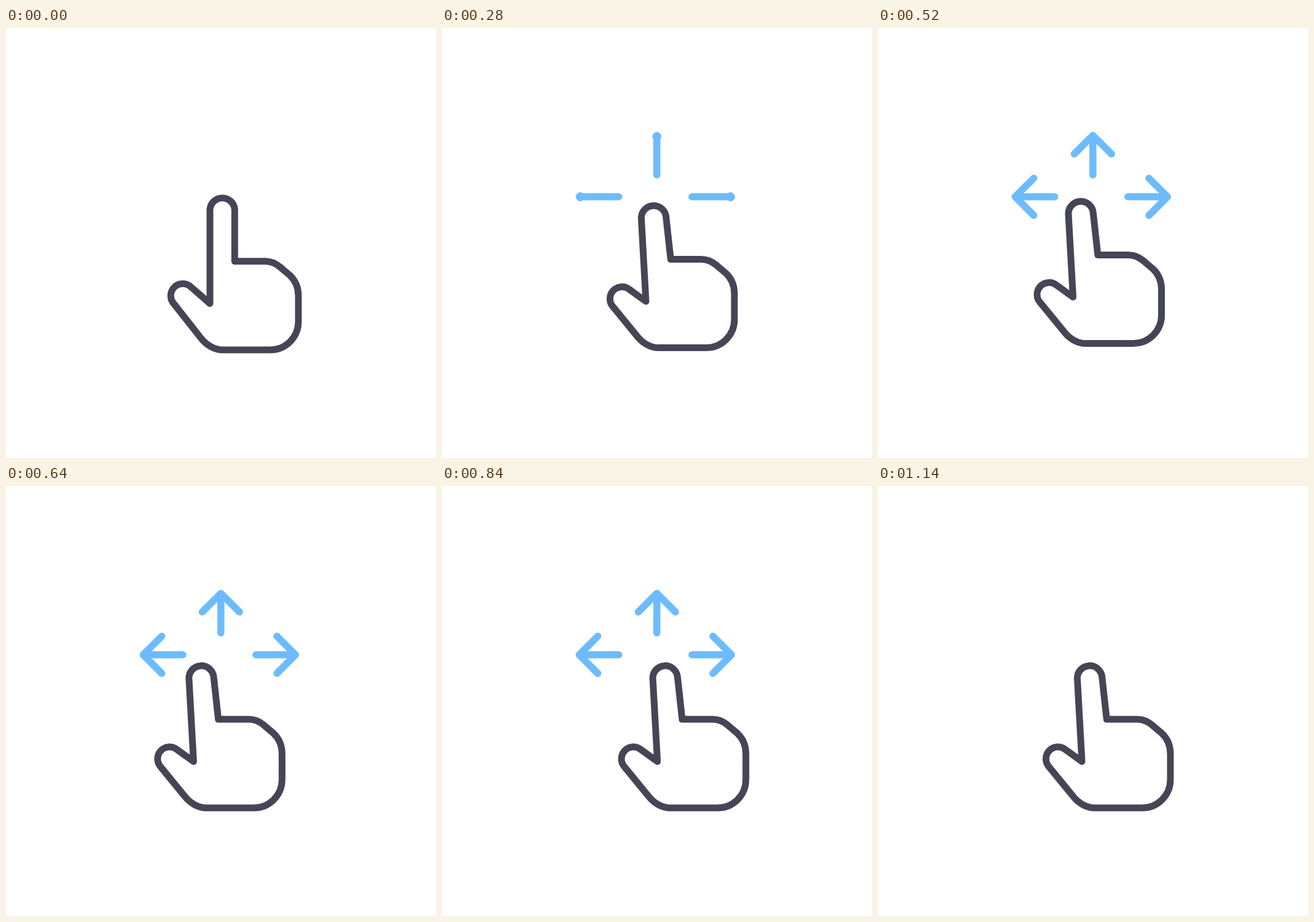
An HTML page that plays this animation: 700x700 px, repeating every 1200 ms.

```html
<!DOCTYPE html>
<html lang="en">
<head>
<meta charset="utf-8">
<title>Drag gesture</title>
<style>
  html, body { margin: 0; width: 100%; height: 100%; overflow: hidden; background: #fff; }
  svg { display: block; width: 100%; height: 100%; }
  path { fill: none; stroke-linecap: round; stroke-linejoin: round; }
  #arrows path { stroke: #6dbbff; stroke-width: 11.5; }
  #hand { stroke: #464556; stroke-width: 11; }
</style>
</head>
<body>
<svg viewBox="0 0 700 700">
  <g id="arrows">
    <path transform="translate(349.8 239.3) rotate(-90)"/>
    <path transform="translate(287.8 274.8) rotate(180)"/>
    <path transform="translate(406.8 274.8)"/>
  </g>
  <path id="hand"/>
</svg>
<script>
const LOOP = 1200, STEP = 20;
const hand = document.getElementById('hand');
const arrows = document.querySelectorAll('#arrows path');

// Eased progress from 0 to 1 between two times
function ease(t, from, to) {
  const p = Math.min(1, Math.max(0, (t - from) / (to - from)));
  return p * p * (3 - 2 * p);
}

// Finger and thumb bend with press (0 to 1); the palm keeps its shape
function handPath(press) {
  const pt = (x0, y0, x1, y1) => `${x0 + (x1 - x0) * press} ${y0 + (y1 - y0) * press}`;
  return `M332 448.5 L${pt(332, 295.5, 324.4, 312.5)}
    A20.2 20.2 0 0 1 ${pt(372.3, 295.5, 364.6, 310)} L372.3 379.8
    H422 C432 379.8 440 384 446 389 L462 402.5 C471 411 476 422 476 436
    V478 A46 46 0 0 1 430 524 H353 C339 524 326 516 317.5 505
    L${pt(273.8, 449.5, 278.6, 457.5)}
    A19.5 19.5 0 0 1 ${pt(301.7, 422.2, 305.3, 429.2)} Z`;
}

function arrowPath(shaft, head) {
  if (shaft < 0.005) return '';
  const tip = 64.5 * shaft, wing = 30.3 * head;
  return `M0 0H${tip}` +
    (head ? `M${tip - wing} ${-wing}L${tip} 0L${tip - wing} ${wing}` : '');
}

function draw(t) {
  const left = ease(t, 435, 600), right = ease(t, 620, 840), back = ease(t, 840, 1020);
  const x = -27.7 * left + 46.4 * right - 18.7 * back;
  const y = -21.8 * (ease(t, 240, 400) - left);
  hand.setAttribute('transform', `translate(${x} ${y})`);
  hand.setAttribute('d', handPath(ease(t, 80, 240)));

  const shaft = ease(t, 100, 260) - ease(t, 980, 1140);
  const head = ease(t, 260, 400) - ease(t, 840, 980);
  for (const arrow of arrows) arrow.setAttribute('d', arrowPath(shaft, head));
}

const start = performance.now();
function tick() {
  const t = (performance.now() - start) % LOOP;
  draw(Math.floor(t / STEP) * STEP);
  requestAnimationFrame(tick);
}
tick();
</script>
</body>
</html>
```
